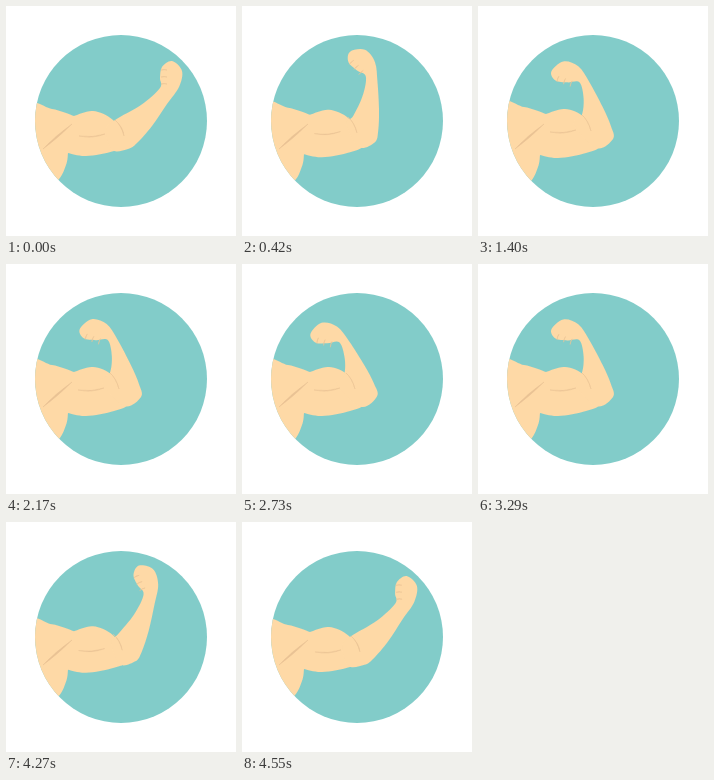
Write an HTML page with a canvas that moves like this. It is 230 px wide and 230 px high and loops after 4.62 s.

```html
<!DOCTYPE html>
<html lang="en">
<head>
<meta charset="utf-8">
<title>Flexing arm</title>
<style>
html, body { margin: 0; width: 100%; height: 100%; overflow: hidden; background: #fff; }
canvas { display: block; width: 230px; height: 230px; }
</style>
</head>
<body>
<canvas id="stage"></canvas>
<script>
const LOOP = 4620, STEP = 70, UP = 823, DOWN = 3657;
const SQUEEZE = 1.07, TURN = -70 * Math.PI / 180;
const TEAL = '#82ccc9', SKIN = '#fed9a6', CREASE = '#e9c294';
const canvas = document.getElementById('stage');
const ctx = canvas.getContext('2d');
const scale = window.devicePixelRatio || 1;
canvas.width = canvas.height = 230 * scale;

// Repeated points make corners.
const upperArm = [[20,103], [46,103], [68,110], [68,110], [87,105], [107,114], [122,136],
  [108,145], [80,150], [62,147], [62,147], [60,159], [50,176], [20,190]];

// Key points of the forearm, stretched and flexed, from inner elbow round the fist.
const stretched = [[100,124], [109,114], [135,99], [154,82], [154,72], [156,61], [166,55],
  [176,65], [173,81], [161,98], [146,120], [131,137], [122,143], [106,144]];
const flexed = [[96,118], [104,109], [106,92], [102,76], [90,76], [78,74], [74,65],
  [86,55], [101,60], [112,76], [125,101], [133,120], [135,133], [118,142]];
const elbowStart = [118, 128], elbowEnd = [127, 132];

const mix = (a, b, k) => a + (b - a) * k;
const blend = (p, q, k) => [mix(p[0], q[0], k), mix(p[1], q[1], k)];
const shift = (pts, dx, dy) => pts.map(([x, y]) => [x + dx, y + dy]);
const ease = u => (1 - Math.cos(Math.PI * u)) / 2;

function spin([x, y], angle) {
  const c = Math.cos(angle), s = Math.sin(angle);
  return [x * c - y * s, x * s + y * c];
}

const toLocal = (pts, [ox, oy], angle) =>
  shift(pts, -ox, -oy).map(p => spin(p, -angle));

function toStage(pts, flex) {
  const pivot = blend(elbowStart, elbowEnd, Math.min(flex, 1));
  return shift(pts.map(p => spin(p, TURN * flex)), ...pivot);
}

const localStretched = toLocal(stretched, elbowStart, 0);
const localFlexed = toLocal(flexed, elbowEnd, TURN);

// The muscle swells away from its middle.
const swell = (pts, k) => pts.map(([x, y]) => [x, y + 2 * k * Math.sign(y - 125)]);

function fillSmooth(pts) {
  const n = pts.length, at = i => pts[(i + n) % n];
  ctx.beginPath();
  ctx.moveTo(...pts[0]);
  for (let i = 0; i < n; i++) {
    const [p, q, r, s] = [at(i - 1), at(i), at(i + 1), at(i + 2)];
    ctx.bezierCurveTo(
      q[0] + (r[0] - p[0]) / 6, q[1] + (r[1] - p[1]) / 6,
      r[0] - (s[0] - q[0]) / 6, r[1] - (s[1] - q[1]) / 6, r[0], r[1]);
  }
  ctx.fillStyle = SKIN;
  ctx.fill();
}

// A thin line that swells in the middle.
function crease([a, b, c], belly) {
  ctx.beginPath();
  ctx.moveTo(...a);
  ctx.quadraticCurveTo(...b, ...c);
  ctx.quadraticCurveTo(b[0] + belly, b[1] + belly, ...a);
  ctx.fillStyle = ctx.strokeStyle = CREASE;
  ctx.lineWidth = 0.5;
  ctx.fill();
  ctx.stroke();
}

// Lift, three pulses, then lower.
function flexAt(t) {
  if (t < UP) return SQUEEZE * ease(1 - Math.pow(1 - t / UP, 1.1));
  if (t > DOWN) return SQUEEZE * (1 - ease(Math.pow((t - DOWN) / (LOOP - DOWN), 1.1)));
  const wave = Math.cos((t - UP) / (DOWN - UP) * 6 * Math.PI);
  return mix(1, SQUEEZE, (1 + wave) / 2);
}

function draw(t) {
  const flex = flexAt(t), k = Math.min(flex, 1);
  ctx.setTransform(scale, 0, 0, scale, 0, 0);
  ctx.fillStyle = '#fff';
  ctx.fillRect(0, 0, 230, 230);
  ctx.save();
  ctx.beginPath();
  ctx.arc(115, 115, 86, 0, 2 * Math.PI);
  ctx.fillStyle = TEAL;
  ctx.fill();
  ctx.clip();

  fillSmooth(swell(upperArm, k));
  fillSmooth(toStage(localStretched.map((p, i) => blend(p, localFlexed[i], k)), flex));

  crease([[37, 143], [49, 130], [66, 118]], 2.5);
  crease(shift([[73, 130], [86, 132], [99, 128]], -k, -4 * k), 1);
  crease(shift([[109, 114], [115, 119], [118, 130]], -5 * k, -5 * k), 2.5 * (1 - k));
  for (let i = 0; i < 3; i++) {
    const y = 64 + 7 * i;
    const knuckle = [[155, y], [158, y - 1], [161, y]];
    crease(toStage(toLocal(knuckle, elbowStart, 0), flex), 0.5);
  }
  ctx.restore();
}

const start = performance.now();
function tick() {
  const t = (performance.now() - start) % LOOP;
  draw(Math.floor(t / STEP) * STEP);
  requestAnimationFrame(tick);
}
tick();
</script>
</body>
</html>
```
